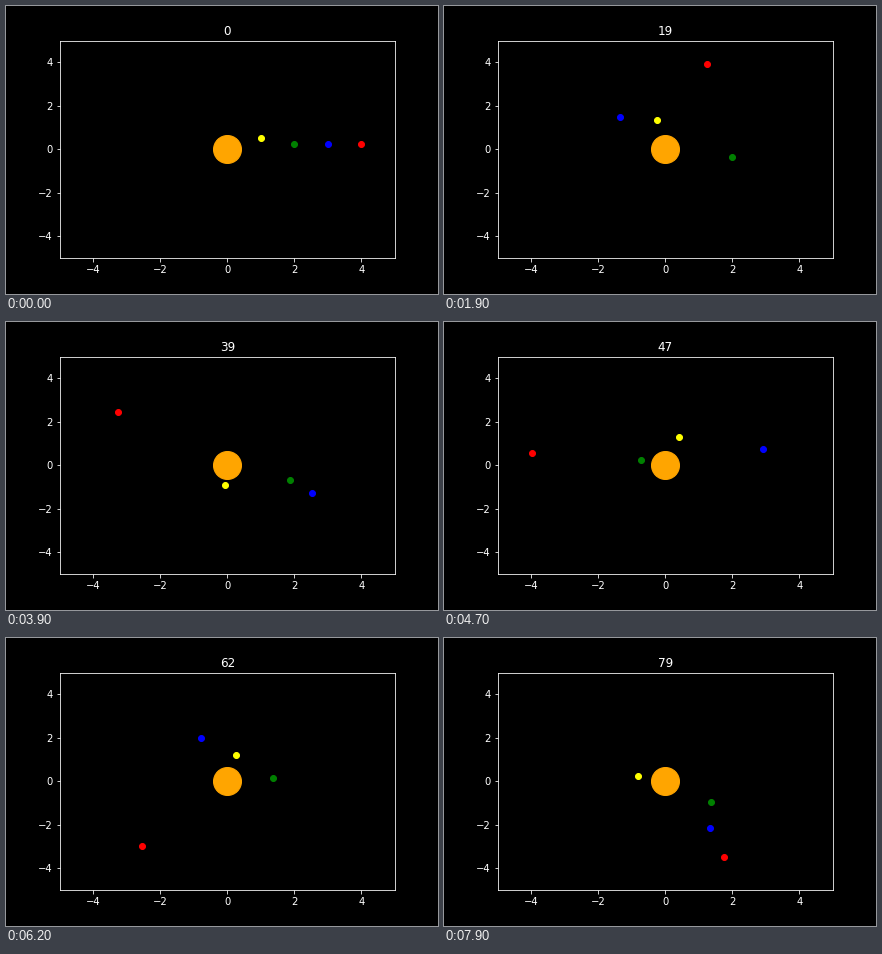
Write a matplotlib script that moves like this. It is 432x288 px and loops after 8 s.

```python
import numpy as np
import matplotlib.pyplot as plt
from matplotlib.animation import FuncAnimation

FRAMES = 80
GM = 4 * np.pi ** 2   # AU^3 / year^2
DT = 1 / 12           # one month per step

COLORS = ["yellow", "green", "blue", "red"]
RADII = [1, 2, 3, 4]
SPEEDS = np.pi * np.array([2, 1, 1, 1])


def orbit(radius, speed):
    """Semi-implicit Euler path of a body launched upwards at (radius, 0)."""
    pos = np.array([radius, 0.0])
    vel = np.array([0.0, speed])
    path = np.empty((FRAMES, 2))
    for i in range(FRAMES):
        pos = pos + vel * DT
        vel = vel - GM * pos / np.hypot(*pos) ** 3 * DT
        path[i] = pos
    return path


paths = [orbit(r, v) for r, v in zip(RADII, SPEEDS)]

plt.style.use("dark_background")
plt.rcParams["font.family"] = "DejaVu Sans"

fig, ax = plt.subplots(figsize=(6, 4), dpi=72)
fig.subplots_adjust(left=0.125, right=0.9, bottom=0.125, top=0.88)
ax.set(xlim=(-5, 5), ylim=(-5, 5),
       xticks=range(-4, 5, 2), yticks=range(-4, 5, 2))

ax.plot(0, 0, "o", color="orange", markersize=28)
planets = [ax.plot([], [], "o", color=c, markersize=6)[0] for c in COLORS]
title = ax.set_title("0")


def update(i):
    for planet, path in zip(planets, paths):
        planet.set_data(path[i:i + 1, 0], path[i:i + 1, 1])
    title.set_text(str(i))
    return [*planets, title]


anim = FuncAnimation(fig, update, frames=FRAMES, interval=100,
                     repeat=True, repeat_delay=0, blit=False)
plt.show()
```
